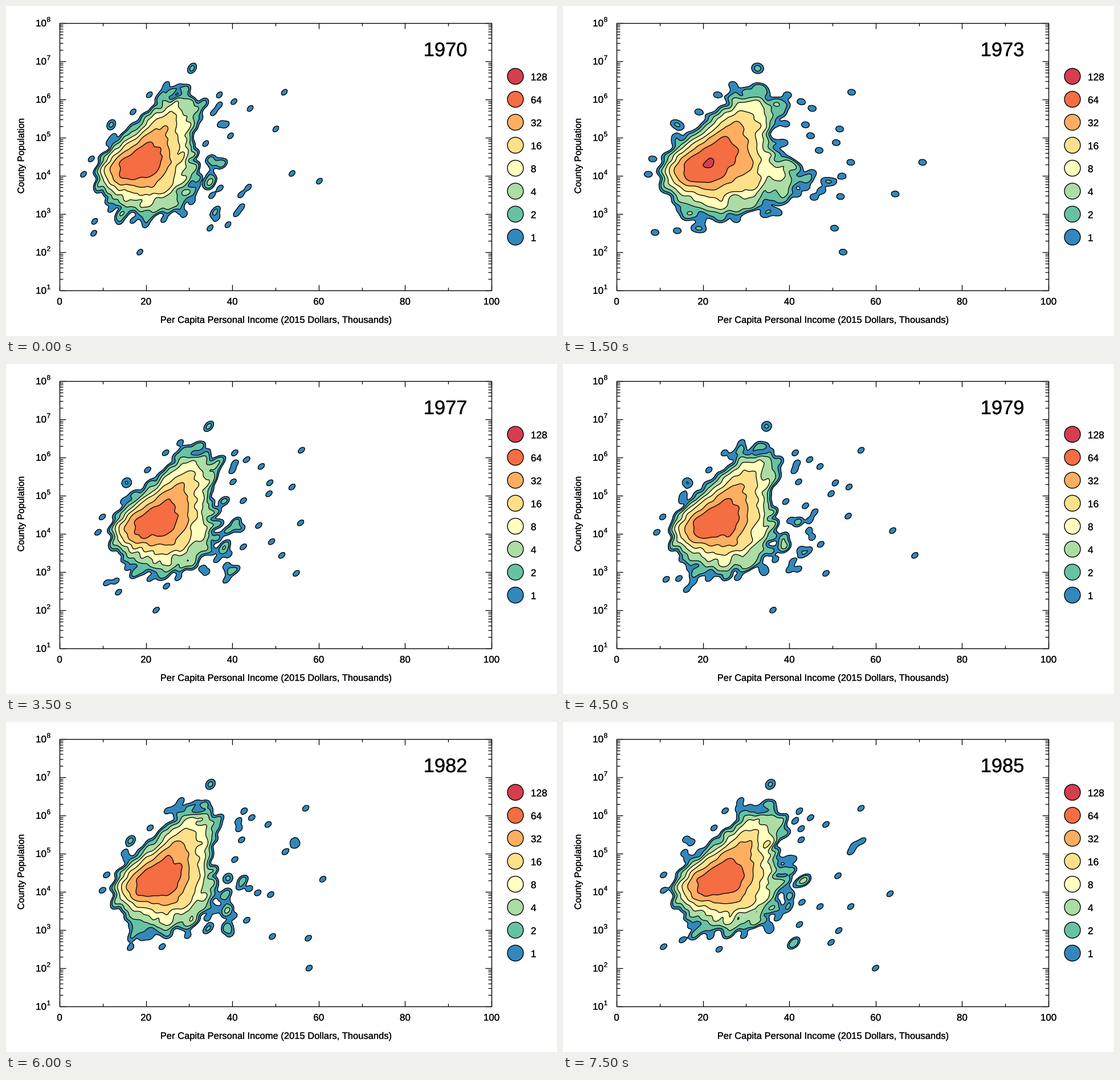
These frames come from a looping animation (967x579 px, 8 s). A matplotlib script:

```python
import numpy as np
import matplotlib.pyplot as plt
import matplotlib.patheffects as pe
from matplotlib.animation import FuncAnimation
from matplotlib.collections import LineCollection
from matplotlib.patches import Ellipse, Rectangle

W, H, DPI = 967, 579, 64
LEFT, RIGHT, TOP, BOTTOM = 94, 852, 29.8, 499
FIRST, LAST = 1970, 1985
COLORS = ["#3288bd", "#66c2a5", "#abdda4", "#ffffbf",
          "#fee08b", "#fdae61", "#f46d43", "#d53e4f"]

# year: poorest income (px), spread, farm boom, kernel width, kernel tilt, smallest county
YEARS = {1970: (155, .97, .00, 5.8, -.40, 235), 1973: (170, 1.07, .75, 7.6, .05, 491),
         1975: (177, .96, .25, 6.7, -.20, 445), 1977: (181, 1.0, .00, 6.3, -.45, 263),
         1979: (186, 1.0, .00, 6.3, -.35, 369), 1982: (186, .97, .00, 6.3, -.35, 532),
         1985: (190, 1.04, .00, 6.4, -.40, 548)}
KERNEL_Y, PEAK, AREA = 5.8, 1.5, 320  # kernel height in px, its peak and its integral

# outlying counties: income beyond the poorest, population, yearly growth (px)
OUTLIERS = np.array([
    (334, 152, 0), (272, 180, 0), (246, 168, 0), (221, 156, .5), (220, 174, 0),
    (231, 208, 7), (318, 216, 0), (240, 228, 5), (172, 107, 0), (170, 112, .3),
    (30, 205, 0), (34, 212, 0), (32, 230, -.5), (100, 156, -.5), (128, 138, -.3),
    (69, 186, 0), (90, 195, 0), (200, 241, 1), (217, 207, .7), (210, 188, 1),
    (-12, 268, 0), (-17, 296, 0), (218, 279, .8), (222, 276, .8)])

# mean shape of the cloud: core and outlines of three density levels
CORE, EDGE = (267, 275), 186
CORE_LOG = 7.07
OUTLINES = {
    6: (222,295, 226,282, 238,268, 258,256, 274,243, 290,233, 304,242, 311,268, 300,298,
        275,305, 250,307, 230,304),
    3: (197,292, 204,268, 225,246, 255,225, 280,203, 298,186, 322,170, 346,168, 358,186,
        358,212, 350,235, 354,262, 356,285, 342,312, 325,335, 295,350, 265,345, 225,330, 205,313),
    0: (186,300, 190,278, 205,255, 240,224, 270,200, 288,178, 305,155, 325,139, 345,137,
        370,150, 382,170, 380,205, 372,235, 376,275, 382,300, 374,335, 360,360, 325,377,
        270,380, 228,372, 205,345, 188,322)}

STEP = 1.5
xs, ys = np.arange(LEFT, RIGHT, STEP), np.arange(TOP, BOTTOM, STEP)
X, Y = np.meshgrid(xs, ys)


def radius(outline, theta):
    """Distance of a closed outline from the core at each angle."""
    p = np.array(outline, float).reshape(-1, 2)
    t = np.linspace(0, 1, 12, endpoint=False)[:, None, None]
    q = (p + (np.roll(p, -1, 0) - p) * t).reshape(-1, 2) - CORE
    return np.interp(theta, np.arctan2(q[:, 1], q[:, 0]), np.hypot(*q.T), period=2 * np.pi)


def mean_density():
    dx, dy = X - CORE[0], Y - CORE[1]
    r, theta = np.hypot(dx, dy), np.arctan2(dy, dx)
    log, inner, top = np.full(X.shape, CORE_LOG), 0, CORE_LOG
    for level, outline in OUTLINES.items():
        outer = radius(outline, theta)
        log -= (top - level) * np.clip((r - inner) / (outer - inner), 0, 1)
        inner, top = outer, level
    return 2 ** (log - np.maximum(r - inner, 0) / 2)


def sample_counties():
    """Random places inside small tiles, with an even share for each tile."""
    rng = np.random.default_rng(7)
    share = (mean_density() * STEP ** 2 / AREA).ravel()
    tile = ((Y // 16) * 100 + X // 16).ravel()
    order = np.lexsort((rng.random(tile.size), tile))
    total = np.cumsum(share[order])
    pick = order[np.searchsorted(total, np.arange(int(total[-1])) + .5)]
    return X.ravel()[pick] - EDGE, Y.ravel()[pick]


def counties(year, left, spread, farm, smallest):
    rng = np.random.default_rng(year)
    u, y = BODY
    rural = np.exp(-((y - 308) / 35) ** 2)
    x = spread * u + farm * rural * np.maximum(u - 100, 0)
    x = x + rng.normal(0, 1, u.size) * (1 + .025 * np.maximum(u, 0))

    n = 22  # small farm counties with volatile incomes
    fx = 200 + 35 * (1 + farm) * rng.exponential(1, n) ** 1.5
    fy = rng.normal(320, 34, n).clip(240, 390)
    hx, hy = rng.uniform(-15, 115, 4), rng.uniform(374, 400, 4)
    ox = OUTLIERS[:, 0] + OUTLIERS[:, 2] * (year - FIRST) + rng.normal(0, 3, len(OUTLIERS))

    px = left + np.concatenate([x, fx, hx, ox, [smallest - left]])
    py = np.concatenate([y, fy, hy, OUTLIERS[:, 1], [432]])
    return px, py


def density(year):
    """log2 of the kernel density estimate for one year."""
    table = np.array(list(YEARS.values())).T
    left, spread, farm, sx, tilt, smallest = [np.interp(year, list(YEARS), c) for c in table]
    px, py = counties(year, left, spread, farm, smallest)
    edges = [np.append(a, a[-1] + STEP) - STEP / 2 for a in (ys, xs)]
    count = np.histogram2d(py, px, bins=edges)[0]

    fy = np.fft.fftfreq(len(ys), STEP)[:, None]
    fx = np.fft.fftfreq(len(xs), STEP)
    sy = KERNEL_Y
    q = (sx * fx) ** 2 + 2 * tilt * sx * sy * fx * fy + (sy * fy) ** 2
    volume = PEAK * 2 * np.pi * sx * sy * np.sqrt(1 - tilt ** 2) / STEP ** 2
    d = np.fft.ifft2(np.fft.fft2(count) * np.exp(-2 * np.pi ** 2 * q)).real * volume
    return np.log2(np.maximum(d, 1e-6))


def pt(px):
    return px * 72 / DPI


plt.rcParams["font.family"] = "Liberation Sans"
fig = plt.figure(figsize=(W / DPI, H / DPI), dpi=DPI, facecolor="white")
ax = fig.add_axes([0, 0, 1, 1])
ax.axis("off")
ax.set(xlim=(0, W), ylim=(H, 0))
ax.set_autoscale_on(False)


def label(x, y, s, size, **kw):
    kw = {"ha": "center", "va": "baseline", **kw}
    bold = pe.withStroke(linewidth=pt(size * .01), foreground="black")
    return ax.text(x, y, s, fontsize=pt(size), color="black", zorder=6,
                   path_effects=[bold], **kw)


def draw_axes():
    ax.add_patch(Rectangle((LEFT, TOP), RIGHT - LEFT, BOTTOM - TOP, fill=False,
                           lw=pt(1.4), zorder=5))
    ticks = []
    for v in range(0, 101, 10):
        x = LEFT + (RIGHT - LEFT) * v / 100
        n = 5 if v % 20 else 10
        ticks += [[(x, BOTTOM), (x, BOTTOM - n)], [(x, TOP), (x, TOP + n)]]
        if v % 20 == 0:
            label(x, 524, str(v), 17)
    decade = (BOTTOM - TOP) / 7
    for e in range(1, 9):
        base = BOTTOM - (e - 1) * decade
        label(71, base + 6, "10", 17, ha="right")
        label(71.5, base - 2, str(e), 12, ha="left")
        for m in range(1, 10 if e < 8 else 2):
            y, n = base - decade * np.log10(m), 11 if m == 1 else 6
            ticks += [[(LEFT, y), (LEFT + n, y)], [(RIGHT, y), (RIGHT - n, y)]]
    ax.add_collection(LineCollection(ticks, colors="black", linewidths=pt(1.3), zorder=5),
                      autolim=False)
    label(474.5, 556, "Per Capita Personal Income (2015 Dollars, Thousands)", 16.55)
    label(27, 263, "County Population", 16.2, rotation=90, va="center")


def draw_legend():
    for i, c in enumerate(COLORS):
        y = 405.5 - i * 40.3
        ax.add_patch(Ellipse((894, y), 28, 28, fc=c, ec="black", lw=pt(1.4)))
        label(921, y + 7, str(2 ** i), 17.3, ha="left")


BODY = sample_counties()
draw_axes()
draw_legend()
year_text = label(771, 88, str(FIRST), 34.5)
maps = {y: density(y) for y in range(FIRST, LAST + 1)}
shown = []


def update(i):
    year = FIRST + i
    while shown:
        shown.pop().remove()
    shown.append(ax.contourf(xs, ys, maps[year], levels=range(9), colors=COLORS, zorder=2))
    shown.append(ax.contour(xs, ys, maps[year], levels=range(8), colors="black",
                            linewidths=pt(1.3), linestyles="solid", zorder=3))
    year_text.set_text(str(year))
    return []


anim = FuncAnimation(fig, update, frames=LAST - FIRST + 1, interval=500,
                     init_func=lambda: update(0), repeat=True, repeat_delay=0, blit=False)
plt.show()
```
